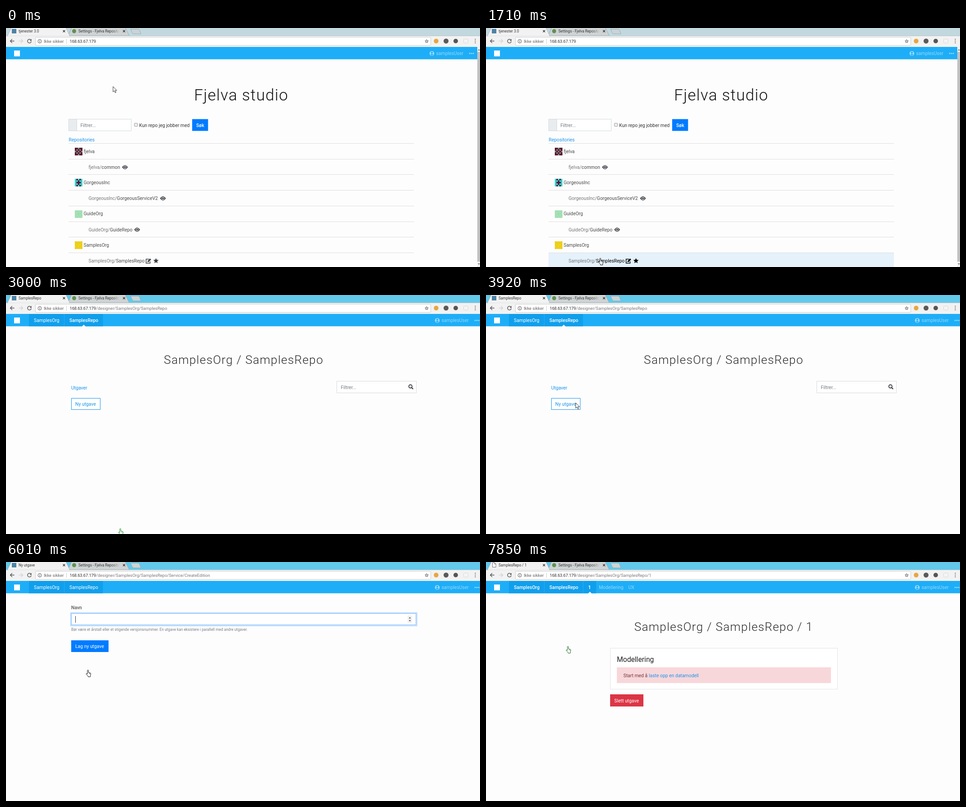
These frames come from a looping animation (1054 by 531 pixels, 8000 ms). An HTML page:

```html
<!DOCTYPE html>
<html lang="no">
<head>
<meta charset="utf-8">
<title>Fjelva studio</title>
<style>
html, body { margin: 0; width: 100%; height: 100%; overflow: hidden; background: #fdfdfd; }
svg { display: block; font: 10.4px Roboto, "Open Sans", sans-serif; }
.h1 { font-size: 26.2px; font-weight: 300; letter-spacing: 1.31px; text-anchor: middle; fill: #2b2b2b; }
.m { font-weight: 500; }
.tab { font-size: 8.2px; }
.url { font-size: 9.5px; }
</style>
</head>
<body>
<svg id="stage" width="1054" height="531" viewBox="0 0 1054 531"></svg>
<script>
const ORG = 'SamplesOrg', REPO = 'SamplesRepo', LINK = '#1a94ee', DARK = '#2f3338';

const text = (x, y, s, fill = '#444', more = '') => `<text x="${x}" y="${y}" fill="${fill}" ${more}>${s}</text>`;
const rect = (x, y, w, h, fill, more = '') => `<rect x="${x}" y="${y}" width="${w}" height="${h}" fill="${fill}" ${more}/>`;
const box = (x, y, w, h, stroke, fill = '#fff') => rect(x + .5, y + .5, w - 1, h - 1, fill, `stroke="${stroke}"`);
const path = (d, fill, more = '') => `<path d="${d}" fill="${fill}" ${more}/>`;
const line = (d, stroke, w = 1) => path(d, 'none', `stroke="${stroke}" stroke-width="${w}"`);
const dot = (x, y, r, fill, more = '') => `<circle cx="${x}" cy="${y}" r="${r}" fill="${fill}" ${more}/>`;
const at = (x, y, s) => `<g transform="translate(${x} ${y})">${s}</g>`;

const closeX = (x, y, r, c, w) => line(`M${x - r} ${y - r}l${2 * r} ${2 * r}m0 ${-2 * r}l${-2 * r} ${2 * r}`, c, w);

const icons = {
  eye: c => path('M-6.3 0Q0-9 6.3 0Q0 9-6.3 0Z', c) + dot(0, 0, 3.1, '#fff') + dot(0, 0, 2.1, c),
  edit: c => line('M1.5-4H-5V5H4V1', c, 1.5) + path('M-2 2.6L-1.6 0L3.8-5.4L6.2-3L.8 2.3Z', c),
  star: c => {
    let d = '';
    for (let i = 0; i < 10; i++) {
      const r = i % 2 ? 2.9 : 6.2, a = i * Math.PI / 5;
      d += `${i ? 'L' : 'M'}${(r * Math.sin(a)).toFixed(2)} ${(-r * Math.cos(a)).toFixed(2)}`;
    }
    return path(d + 'Z', c);
  }
};

const cursors = {
  arrow: () => path('M0 0V12L2.8 9.4L4.8 13.9L6.7 13L4.8 8.8H8.4Z', '#fff', 'stroke="#222" stroke-width=".9"'),
  hand: c => path('M3.5 9.5V1.8Q3.5.5 4.7.5T5.9 1.8V6l4 1Q11.3 7.4 11 9l-1 4v2.5H4.9V13.8L1 9.8Q.3 8.6 1.3 8.2t2.2 1.3Z', '#fff', `stroke="${c || '#111'}"`)
    + line('M7.5 7v2.5M9.2 7.5v2', c || '#111', .6)
};

const tabIcons = {
  site: () => rect(13, 2, 10, 10, '#4b83a8'),
  page: () => path('M14.5 1.5H19L22 4.5V11.5H14.5ZM19 1.5V4.5H22', '#fff', 'stroke="#666" stroke-width=".9"'),
  spin: s => dot(18, 7, 5, 'none', `stroke="#777" stroke-dasharray="${s.arc} 40" transform="rotate(-95 18 7)"`)
};

function browser(s) {
  const tail = s.path ? text(200, 33, s.path, '#777', 'class="url"') : '';
  const reload = s.tab === 'spin'
    ? closeX(52, 29, 3.7, '#555', 1.4)
    : line('M55.4 26.6A4.2 4.2 0 1 0 56.2 30', '#555', 1.4) + path('M56.8 24.3V28.4H52.7Z', '#555');
  return rect(0, 0, 1054, 18, s.strip)
    + path('M138 17L146-1H265L274 17Z', '#cfd3d4', 'stroke="#8fa5ad" stroke-width=".8"')
    + dot(151.5, 7, 4.5, '#5f9150')
    + text(161, 10, 'Settings - Fjelva Reposito', '#333', 'class="tab"')
    + rect(235, 1, 18, 14, 'url(#fade)') + rect(253, 1, 5, 14, '#cfd3d4')
    + closeX(262.5, 7, 2.4, '#222', 1.3)
    + path('M277 2.5H294Q296 2.5 297 5L300 13H284Q282 13 281 11Z', '#cbd3d6', 'stroke="#8fa5ad" stroke-width=".8"')
    + rect(0, 17, 1054, 25, '#f2f2f2') + line('M0 17.5H4M141 17.5H1054', '#b9c7cb')
    + path('M3 18L12-1H133L142 18Z', '#f2f2f2', 'stroke="#9fb2b8" stroke-width=".8"') + rect(4, 17.5, 137, 2, '#f2f2f2')
    + tabIcons[s.tab](s) + text(28, 10, s.title, '#333', 'class="tab"') + closeX(129, 7, 2.4, '#222', 1.3)
    + line('M18.5 29H9.5M13.8 24.7L9.5 29L13.8 33.3', '#555', 1.4)
    + line('M28.5 29H37.5M33.2 24.7L37.5 29L33.2 33.3', '#d2d2d2', 1.4) + reload
    + rect(65.5, 20.5, 879, 18, '#fff', 'rx="1.5" stroke="#cfcfcf"')
    + dot(75, 29.5, 4, 'none', 'stroke="#555"') + rect(74.5, 28.8, 1.1, 3, '#555') + rect(74.5, 27, 1.1, 1.1, '#555')
    + text(84, 33, 'Ikke sikker', '#666', 'class="url"') + rect(134, 24, 1, 11, '#ccc')
    + text(141.5, 33, '168.63.67.179', '#333', 'class="url" letter-spacing="-.2"') + tail
    + at(935.5, 29.5, `<g transform="scale(.75)">${icons.star('#555')}</g><g transform="scale(.4)">${icons.star('#fff')}</g>`)
    + dot(956.5, 29, 5.2, '#e9a640') + dot(978.5, 29, 5.5, '#5a5a5a') + dot(1000, 29, 5, '#555')
    + rect(1017.5, 24.5, 10, 9, '#f4f4f4', 'rx="2" stroke="#d8d8d8"')
    + [25, 29, 33].map(y => dot(1043.5, y, 1.1, '#555')).join('');
}

function header(s) {
  const dx = s.nav ? 12 : 0, pale = '#96d8fb';
  let out = rect(0, 42, 1054, 27.5, '#1eaef7') + rect(18, 50, 13, 13, '#fff')
    + dot(947 + dx, 56.5, 5.3, pale) + dot(947 + dx, 54.7, 2, '#1eaef7')
    + path(`M${943.8 + dx} 59.5Q${947 + dx} 55.5 ${950.2 + dx} 59.5Q${947 + dx} 62 ${943.8 + dx} 59.5Z`, '#1eaef7')
    + text(956.5 + dx, 60.2, 'samplesUser', pale)
    + [0, 4, 8].map(d => dot(1031.2 + dx + d, 56.5, 1.5, pale)).join('');
  if (s.nav) {
    const ends = s.nav === 'edition' ? 245 : 215.5, notch = { repo: 173, edition: 231 }[s.nav];
    out += rect(51, 42, ends - 51, 27.5, '#109fec') + rect(129, 42, 1, 27.5, '#2aaef3')
      + text(62, 60.3, ORG, '#fff', s.nav === 'edition' ? 'class="m"' : '')
      + text(141, 60.3, REPO, '#fff', s.nav === 'form' ? '' : 'class="m"');
    if (notch) out += path(`M${notch - 4} 70L${notch} 66L${notch + 4} 70Z`, '#fdfdfd');
    if (s.nav === 'edition')
      out += rect(215.5, 42, 1, 27.5, '#2aaef3') + text(227.3, 60.3, '1', '#fff', 'font-weight="700"')
        + text(251, 60.2, 'Modellering', pale) + text(316.5, 60.2, 'UX', pale);
  }
  return out;
}

// Mirrored 5 x 5 tile picture; each row gives its left three cells as bits.
function avatar(x, y, back, front, rows) {
  let out = rect(x, y, 17, 17, back);
  rows.forEach((bits, j) => {
    for (let i = 0; i < 5; i++)
      if (bits >> (2 - Math.min(i, 4 - i)) & 1) out += rect(x + i * 3.4, y + j * 3.4, 3.4, 3.4, front);
  });
  return out;
}

const repos = [
  ['fjelva', 'common', ['eye', 264.5], '#5c0c30', '#7b8a78', [1, 2, 5, 2, 1]],
  ['GorgeousInc', 'GorgeousServiceV2', ['eye', 349], '#5a1238', '#35e3d8', [5, 6, 4, 6, 5]],
  ['GuideOrg', 'GuideRepo', ['eye', 291.5], '#9adfb5', '#b0dfb4', [5, 2, 4, 2, 5]],
  [ORG, REPO, ['edit', 316.5, 'star', 333.5], '#e8d71c', '#f2c81c', [5, 2, 4, 2, 5]]
];

function home(s) {
  let out = text(523, 161, 'Fjelva studio', '#111', 'class="h1" style="font-size:35px;fill:#111"')
    + box(139, 202, 140, 27, '#d3d9de') + rect(139.5, 202.5, 18, 26, '#e9ecef', 'stroke="#d3d9de"')
    + text(165.5, 219.5, 'Filtrer...', '#75797d')
    + rect(285.5, 211.5, 7, 7, '#eee', 'rx="1" stroke="#999"')
    + text(296, 219.5, 'Kun repo jeg jobber med', '#333')
    + rect(414, 202.4, 35.3, 26.2, '#007bff') + text(423, 219.5, 'Søk', '#fff', 'class="m"')
    + text(139.5, 252, 'Repositories', LINK);
  repos.forEach(([org, name, marks, back, front, rows], i) => {
    const y = 256 + i * 69.4, split = Math.floor(y + 35.3);
    const hot = s.hot === i, ink = hot ? '#000' : '#4a4a4a', mark = hot ? '#000' : '#3b3f44';
    if (hot) out += rect(139, split + 1, 768, 34, '#e5f1fb');
    out += rect(139, Math.round(y), 768, 1, '#dedede') + rect(139, split, 768, 1, '#dedede')
      + avatar(153, Math.round(y + 10), back, front, rows) + text(172.5, y + 21.6, org, '#4a4a4a')
      + text(183.5, y + 57, `${org}/<tspan fill="${ink}">${name}</tspan>`, '#777');
    for (let k = 0; k < marks.length; k += 2) out += at(marks[k + 1], y + 53.2, icons[marks[k]](mark));
  });
  return out + rect(1048, 42, 6, 489, '#f1f1f1') + rect(1048, 53, 6, 466, '#c1c1c1')
    + path('M1049 50L1051.5 47L1054 50Z', '#777') + path('M1049 523L1051.5 526L1054 523Z', '#777');
}

function repo(s) {
  const fill = s.button === 'hover' ? LINK : '#fff', ink = s.button === 'hover' ? '#fff' : LINK;
  let out = text(528.5, 152.5, `${ORG} / ${REPO}`, '', 'class="h1"')
    + text(145, 209.7, 'Utgaver', LINK)
    + box(735, 191, 178, 27, '#d6d9dc') + text(744.5, 209.3, 'Filtrer...', '#75797d')
    + dot(899.3, 203, 3.6, 'none', `stroke="${DARK}" stroke-width="1.7"`) + line('M902 205.7L905.3 209', DARK, 2);
  if (s.button === 'focus') out += rect(144, 228, 67, 28.5, 'none', 'stroke="#82bcfa" stroke-width="2"');
  return out + box(145, 229, 65, 26, s.button === 'focus' ? '#2487ea' : LINK, fill)
    + text(154, 246.2, 'Ny utgave', ink);
}

function form(s) {
  let out = text(145, 104.5, 'Navn', '#555', 'class="m"');
  if (s.focus) out += rect(144, 113, 769.5, 28.5, 'none', 'stroke="#bfdeff" stroke-width="2.5"');
  out += box(145, 114, 767, 26, s.focus ? '#80bdff' : '#ced4da')
    + text(154, 131.5, s.value, '#495057');
  if (s.caret) out += rect(s.caret, 120, 1, 15, '#333');
  if (s.focus) out += rect(893, 119, 10, 16, '#f0f0f0') + path('M895.7 125.3L898 122.4L900.3 125.3ZM895.7 129.2L898 132.1L900.3 129.2Z', '#444');
  if (s.ring) out += rect(144, 173, 85, 28, 'none', 'stroke="#80bdff" stroke-width="2"');
  return out + text(145, 153.3, 'Bør være et årstall eller et stigende versjonsnummer. En utgave kan eksistere i parallell med andre utgaver.', '#7a7f84', 'font-size="8.35"')
    + rect(145, 174, 83, 26, s.submit) + text(154, 191, 'Lag ny utgave', '#fff');
}

const edition = () => text(528.5, 152.5, `${ORG} / ${REPO} / 1`, '', 'class="h1"')
  + box(276, 191, 506, 92, '#e3e3e3')
  + text(291, 221.7, 'Modellering', '#222', 'font-size="15.7"')
  + rect(291, 234, 476, 35, '#f8d7da')
  + text(305.5, 256.2, 'Start med å', '#74343a') + text(362, 256.2, 'laste opp en datamodell', LINK)
  + rect(276, 294, 74, 27, '#dc3545') + text(285.3, 311.8, 'Slett utgave', '#fff');

const base = `/designer/${ORG}/${REPO}`;
// Each step overrides the one before; cursor is [kind, x, y, outline].
const steps = [
  [0, { page: home, strip: '#c2d8df', tab: 'site', title: 'tjenester 3.0', path: '', nav: '', hot: -1, cursor: ['arrow', 238, 130] }],
  [70, { cursor: ['arrow', 233.5, 292] }],
  [1030, { hot: 0, cursor: ['hand', 247, 466.5] }],
  [1710, { hot: 3, cursor: ['hand', 249.5, 511] }],
  [2160, { hot: -1, strip: '#62c9ea', cursor: ['hand', 249.5, 518.5, '#14881f'] }],
  [3000, { page: repo, title: REPO, path: base, nav: 'repo', button: '' }],
  [3330, { cursor: ['arrow', 215, 350.5] }],
  [3920, { cursor: ['arrow', 199.5, 239.5] }],
  [4520, { button: 'hover', cursor: ['hand', 177.5, 239.5] }],
  [5110, { button: 'focus', tab: 'spin', arc: 1 }],
  [5400, { page: form, title: 'Ny utgave', path: base + '/Service/CreateEdition', nav: 'form', tab: 'page', value: '', caret: 0, focus: false, ring: false, submit: '#007bff' }],
  [6010, { tab: 'site', focus: true, caret: 154 }],
  [6230, { caret: 0 }],
  [6380, { value: '1', caret: 159 }],
  [6620, { cursor: ['hand', 177.5, 187] }],
  [6950, { submit: '#0069d9' }],
  [7170, { submit: '#0064db', cursor: ['arrow', 180.8, 188] }],
  [7330, { focus: false, caret: 0, ring: true, tab: 'spin', arc: 6 }],
  [7710, { arc: 18, cursor: ['hand', 177.5, 187, '#1d6b22'] }],
  [7850, { page: edition, title: REPO + ' / 1', path: base + '/1', nav: 'edition', tab: 'page' }]
];
let last = {};
const states = steps.map(([, change]) => last = { ...last, ...change });

const fade = '<defs><linearGradient id="fade"><stop stop-color="#cfd3d4" stop-opacity="0"/><stop offset="1" stop-color="#cfd3d4"/></linearGradient></defs>';
const stage = document.getElementById('stage');
const start = performance.now();
let shown = -1;

function draw(now) {
  const time = Math.max(0, now - start) % 8000;
  const i = steps.filter(([from]) => from <= time).length - 1;
  if (i !== shown) {
    shown = i;
    const s = states[i], [kind, x, y, outline] = s.cursor;
    stage.innerHTML = fade + rect(0, 0, 1054, 531, '#fdfdfd') + browser(s) + header(s) + s.page(s)
      + at(x, y, cursors[kind](outline));
  }
  requestAnimationFrame(draw);
}
draw(start);
</script>
</body>
</html>
```
